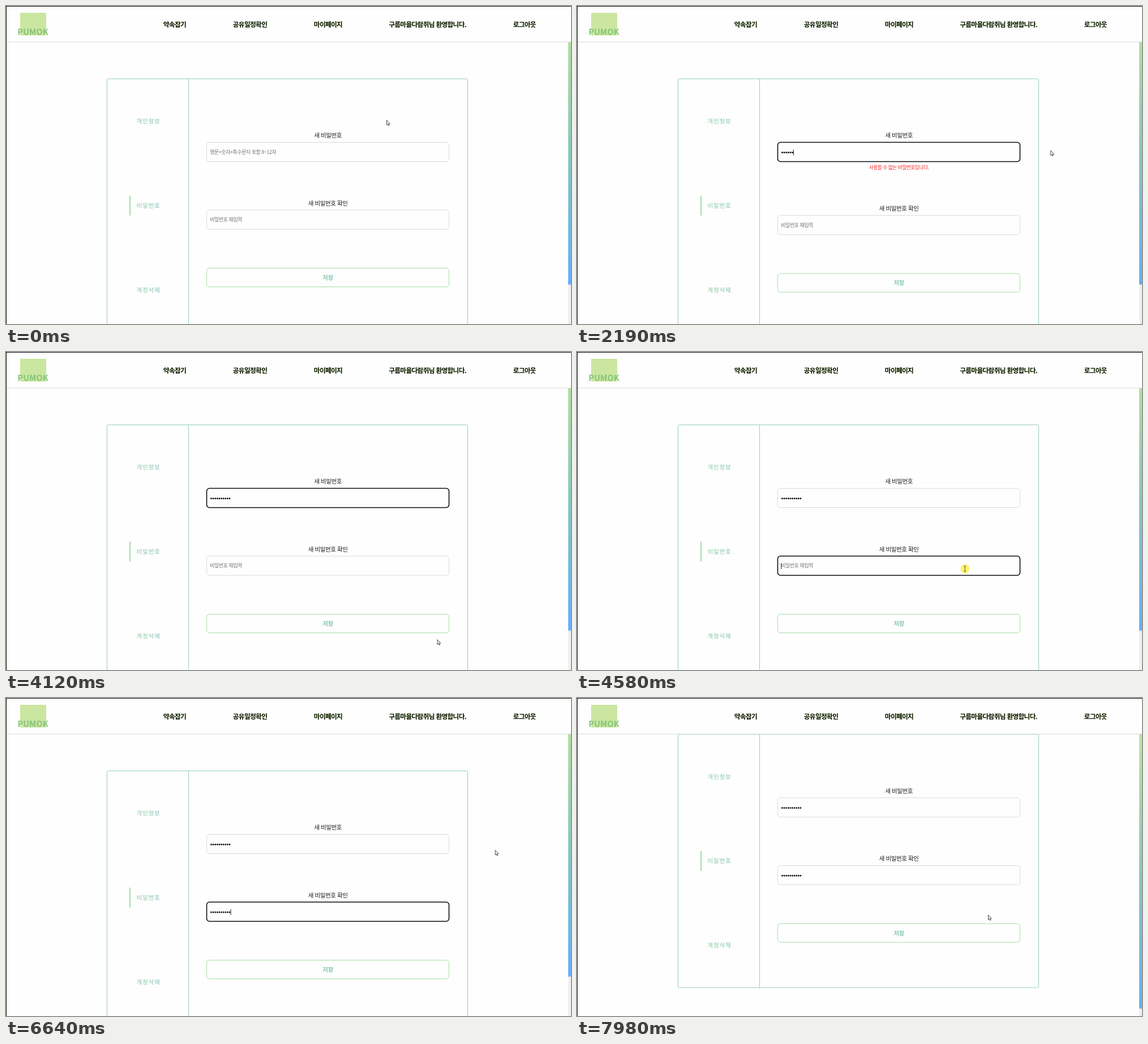
These frames come from a looping animation (998x561 px, 8 s). An HTML page:

```html
<!DOCTYPE html>
<html lang="ko">
<head>
<meta charset="utf-8">
<title>비밀번호 변경</title>
<style>
  html, body { margin: 0; width: 100%; height: 100%; overflow: hidden; background: #fefefe; }
  svg { display: block; width: 998px; height: 561px; }
  text { font-family: 'Noto Sans CJK KR', 'Noto Sans CJK', 'Noto Sans CJK JP', sans-serif; white-space: pre; }
  .mid { text-anchor: middle; }
  .nav { font-size: 11.6px; font-weight: 700; letter-spacing: -.6px; fill: #10160c; filter: drop-shadow(.8px .8px .6px #a5dd5c); }
  .side { font-size: 10.6px; letter-spacing: .75px; fill: url(#ink); }
  .label { font-size: 10.5px; letter-spacing: -.42px; fill: #1c1c24; }
  .hint { font-size: 9.1px; letter-spacing: -.54px; fill: #757575; }
  .error { font-size: 8.6px; letter-spacing: -.4px; fill: #f22; }
  .save { font-size: 10.5px; font-weight: 700; letter-spacing: -.4px; fill: url(#ink); }
  .box { fill: #fefefe; stroke: #d9dadb; stroke-width: 1; }
  .box.focus { stroke: #0c0c10; stroke-width: 1.6; }
  .line { fill: none; stroke: #96cebc; }
</style>
</head>
<body>
<svg viewBox="0 0 998 561">
  <defs>
    <linearGradient id="ink">
      <stop offset="0" stop-color="#92cd9c"/><stop offset="1" stop-color="#78bdbb"/>
    </linearGradient>
    <linearGradient id="bar" x2="0" y2="1">
      <stop offset="0" stop-color="#c0e49a"/><stop offset=".5" stop-color="#8bc9b8"/><stop offset="1" stop-color="#66aef8"/>
    </linearGradient>
  </defs>
  <rect width="998" height="561" fill="#fefefe"/>

  <g id="page">
    <rect class="line" x="178.5" y="128.5" width="637" height="447" rx="2"/>
    <path class="line" d="M322.5 128.5V575.5"/>
    <path d="M219 334.5V369.5" stroke="#92d98f" stroke-width="1.7"/>
    <text class="side mid" x="251.6" y="207.2">개인정보</text>
    <text class="side mid" x="251.6" y="355.9">비밀번호</text>
    <text class="side mid" x="251.6" y="504.7">계정삭제</text>
    <g id="fields"></g>
    <g id="button">
      <rect x="354.5" y="462.5" width="428" height="33" rx="5" fill="#fefefe" stroke="#a3dfa2"/>
      <text class="save mid" x="568.6" y="483">저장</text>
    </g>
  </g>

  <rect x="993" y="64" width="5" height="497" fill="#efefef"/>
  <rect id="thumb" x="993" width="5" height="491.5" fill="url(#bar)"/>

  <rect width="998" height="63" fill="#fefefe"/>
  <path d="M0 63.5H998" stroke="#dcdcdc"/>
  <rect x="25" y="12" width="46" height="40" rx="1" fill="#cbe6a0"/>
  <text class="mid" x="47.6" y="51" font-size="14.5" font-weight="900" fill="#84c57a">PUMOK</text>
  <g id="nav"></g>
  <path d="M0 .5H998M.5 0V561" stroke="#0a0a0a"/>

  <g id="pointer">
    <circle id="click" r="8" fill="#fdf25f" opacity=".9"/>
    <path id="arrow" d="M.5 .5V9L2.4 7.3L3.7 10.1L5 9.5L3.8 6.8H6.2Z" fill="#fff" stroke="#333" stroke-width=".9"/>
    <path id="beam" d="M-2 -4.5H2M0 -4.5V4.5M-2 4.5H2" fill="none" stroke="#444" stroke-width=".9"/>
  </g>
</svg>
<script>
const LOOP = 8000, BLINK = 530;
const $ = id => document.getElementById(id);

const menu = [['약속잡기', 298], ['공유일정확인', 431], ['마이페이지', 569],
              ['구름마을다람쥐님 환영합니다.', 744.6], ['로그아웃', 915.8]];
$('nav').innerHTML = menu.map(([s, x]) => `<text class="nav mid" x="${x}" y="36.5">${s}</text>`).join('');

// keys: [time, number of characters]
const fields = [
  { y: 240, label: '새 비밀번호', hint: '영문+숫자+특수문자 포함 8~12자', error: '사용할 수 없는 비밀번호입니다.',
    focus: 460, blur: 4520,
    keys: [[1590, 2], [1790, 3], [1920, 4], [2120, 5], [2190, 6], [2460, 8], [3400, 9], [3460, 10]] },
  { y: 359.5, label: '새 비밀번호 확인', hint: '비밀번호 재입력', error: '비밀번호가 일치하지 않습니다.',
    focus: 4520, blur: 7580,
    keys: [[5110, 2], [5440, 4], [5710, 5], [5770, 6], [6040, 8], [6570, 9], [6640, 10]] }
];
const PITCH = 3.62, FULL = 10, ERROR_SHIFT = 9.4;

$('fields').innerHTML = fields.map(f => `<g>
  <text class="label mid" x="568.6" y="${f.y - 7.8}">${f.label}</text>
  <rect class="box" x="354.5" y="${f.y + .5}" width="428" height="34" rx="5"/>
  <text class="hint" x="360" y="${f.y + 20.7}">${f.hint}</text>
  <g class="dots">${Array.from({ length: FULL }, (_, i) =>
    `<circle cx="${362.4 + i * PITCH}" cy="${f.y + 18.5}" r="1.4" fill="#111"/>`).join('')}</g>
  <rect class="caret" y="${f.y + 13}" width=".9" height="10.5" fill="#111"/>
  <text class="error mid" x="568.6" y="${f.y + 48.2}">${f.error}</text></g>`).join('');
[...$('fields').children].forEach((g, i) => {
  const pick = s => g.querySelector(s);
  Object.assign(fields[i], { g, box: pick('.box'), hintEl: pick('.hint'), errorEl: pick('.error'),
    caret: pick('.caret'), dots: [...pick('.dots').children] });
});

const path = [[0, 672, 201], [70, 672, 201], [400, 681, 253], [600, 681, 253], [990, 836.3, 254.5],
  [3800, 836.3, 254.5], [4150, 760, 512], [4500, 685.3, 382.5], [4640, 685.3, 382.5], [4910, 863.7, 268],
  [7120, 863.7, 268], [7240, 800, 370], [7580, 800, 370], [7700, 791, 375.5], [7780, 791, 375.5], [7980, 726, 382.3]];
const clicks = [[460, 600], [4520, 4640], [7580, 7680]];

const ease = u => { u = Math.min(1, Math.max(0, u)); return u * u * (3 - 2 * u); };
const show = (el, on) => el.setAttribute('visibility', on ? 'visible' : 'hidden');
const move = (el, x, y) => el.setAttribute('transform', `translate(${x} ${y})`);

function pointerAt(t) {
  const i = path.findIndex(p => p[0] > t);
  if (i < 0) return path[path.length - 1].slice(1);
  const [a, b] = [path[i - 1], path[i]], u = ease((t - a[0]) / (b[0] - a[0]));
  return [a[1] + (b[1] - a[1]) * u, a[2] + (b[2] - a[2]) * u];
}

function render(t) {
  const scroll = 64.5 * ease((t - 7768) / 212);
  const [px, py] = pointerAt(t);
  let shift = 0, over = false;

  for (const f of fields) {
    const typed = f.keys.filter(k => k[0] <= t);
    const [last, count] = typed.length ? typed[typed.length - 1] : [f.focus, 0];
    const focused = t >= f.focus && t < f.blur;
    const bad = count > 0 && count < FULL;
    move(f.g, 0, shift);
    f.box.classList.toggle('focus', focused);
    show(f.hintEl, !count);
    show(f.errorEl, bad);
    f.dots.forEach((d, i) => show(d, i < count));
    f.caret.setAttribute('x', 360.4 + count * PITCH);
    show(f.caret, focused && Math.floor((t - last) / BLINK) % 2 === 0);
    const top = f.y + shift - scroll;
    over = over || (px > 354 && px < 783 && py > top && py < top + 35);
    if (bad) shift += ERROR_SHIFT;
  }

  move($('button'), 0, shift);
  move($('page'), 0, -scroll);
  $('thumb').setAttribute('y', scroll * .875);
  move($('pointer'), px, py);
  show($('arrow'), !over);
  show($('beam'), over);
  show($('click'), clicks.some(([a, b]) => t >= a && t < b));
}

const start = performance.now();
function tick() {
  render((performance.now() - start) % LOOP);
  requestAnimationFrame(tick);
}
tick();
</script>
</body>
</html>
```
